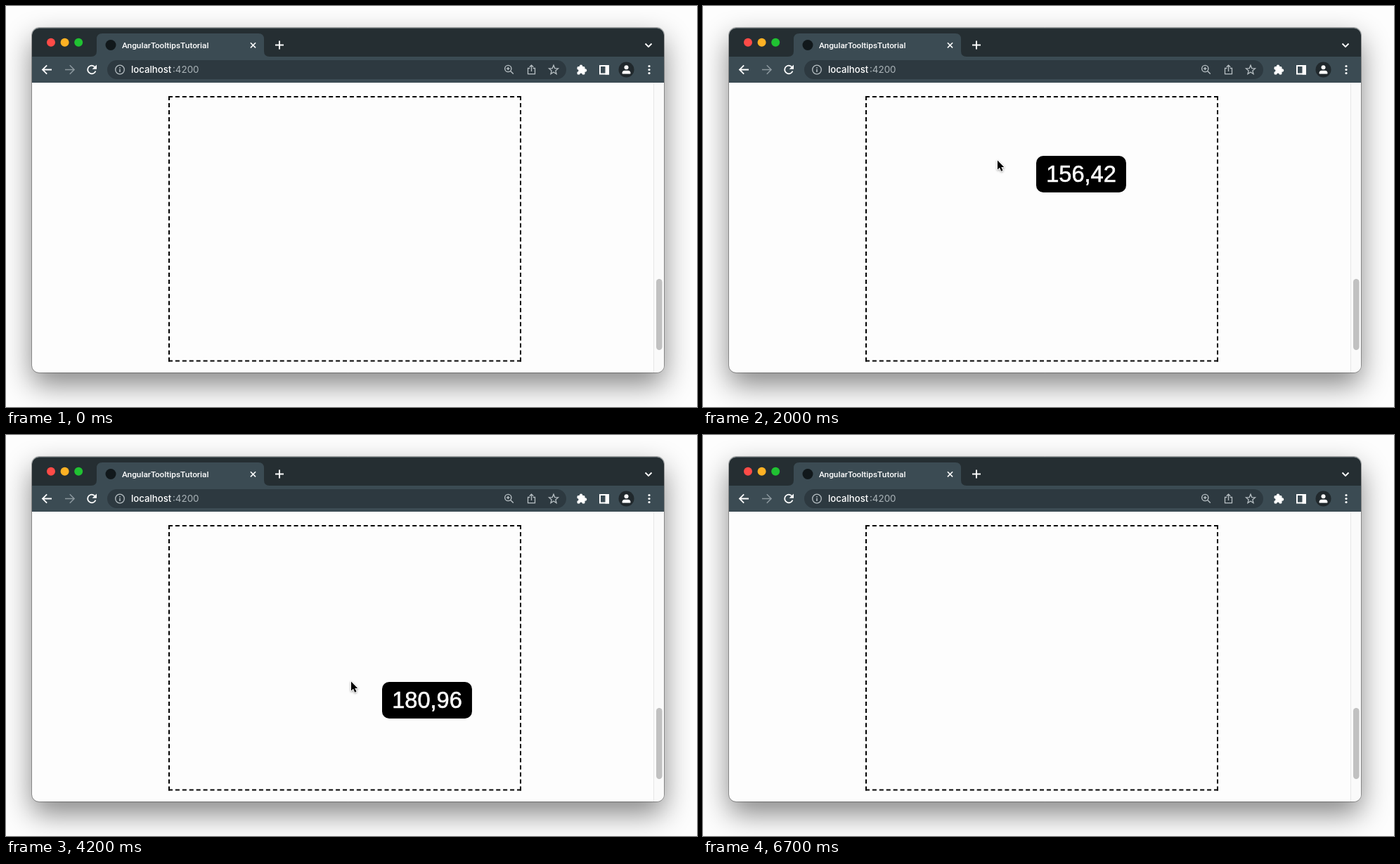
An HTML page with a canvas that plays this animation: 983 px wide and 570 px high, repeating every 6800 ms.

```html
<!DOCTYPE html>
<html lang="en">
<head>
<meta charset="utf-8">
<title>Tooltip following the pointer</title>
<style>
html, body { margin: 0; width: 100%; height: 100%; overflow: hidden; background: #fdfdfd; }
canvas { display: block; }
</style>
</head>
<body>
<canvas id="stage" width="983" height="570"></canvas>
<script>
const W = 983, H = 570, LOOP = 6800, STEP = 100;
const WHITE = '#fff', GREY = '#b7bfc3', TAB = '#3b4b53';
const AREA = { left: 231, top: 128, right: 733, bottom: 505.5 };
const ZOOM = 2.57, LAG = 40;
const screen2d = document.getElementById('stage').getContext('2d');
const backdrop = document.createElement('canvas');
backdrop.width = W;
backdrop.height = H;
let g = backdrop.getContext('2d');

// Key points of the pointer: time, x, y
const path = [
  [500, 700, -6], [1200, 574, 127], [1960, 425, 216], [2660, 350, 241], [3160, 336, 264],
  [3460, 388, 319], [3900, 455, 372], [4660, 549, 289], [5260, 668, 191], [5600, 944, -2]
];

// Smooth curve through the key points, null outside their time span
function pointerAt(t) {
  const last = path.length - 1;
  if (t < path[0][0] || t > path[last][0]) return null;
  const i = Math.max(0, path.findLastIndex((p, n) => n < last && p[0] <= t));
  const a = path[i], b = path[i + 1], span = b[0] - a[0];
  const u = (t - a[0]) / span, w = 1 - u;
  const slope = (n, k) => {
    const p = path[Math.max(0, n - 1)], q = path[Math.min(last, n + 1)];
    return (q[k] - p[k]) / (q[0] - p[0]);
  };
  return [1, 2].map(k => a[k] * (1 + 2 * u) * w * w + b[k] * u * u * (3 - 2 * u)
    + span * u * w * (slope(i, k) * w - slope(i + 1, k) * u));
}

function inArea([x, y]) {
  return x > AREA.left && x < AREA.right && y > AREA.top && y < AREA.bottom;
}

function box(x, y, w, h, r, color) {
  g.beginPath();
  g.roundRect(x, y, w, h, r);
  g.fillStyle = color;
  g.fill();
}

function stroke(color, width) {
  g.strokeStyle = color;
  g.lineWidth = width;
  g.stroke();
}

function circle(x, y, r) {
  g.beginPath();
  g.arc(x, y, r, 0, Math.PI * 2);
}

function disc(x, y, r, color) {
  circle(x, y, r);
  g.fillStyle = color;
  g.fill();
}

function ring(x, y, r, width) {
  circle(x, y, r);
  stroke(GREY, width);
}

function line(d, x, y, color, width) {
  g.save();
  g.translate(x, y);
  g.strokeStyle = color;
  g.lineWidth = width;
  g.stroke(new Path2D(d));
  g.restore();
}

function label(text, x, y, font, color) {
  g.font = font;
  g.fillStyle = color;
  g.fillText(text, x, y);
}

function drawWindow() {
  g.fillStyle = '#fdfdfd';
  g.fillRect(0, 0, W, H);
  g.save();
  g.shadowColor = 'rgba(0,0,0,.48)';
  g.shadowBlur = 40;
  g.shadowOffsetY = 17;
  box(37, 31, 899, 490, 10, '#fdfdfd');
  g.restore();
  g.beginPath();
  g.roundRect(36.5, 30.5, 900, 491, 10.5);
  stroke('rgba(0,0,0,.3)', 1);
  box(37, 31, 899, 42, [10, 10, 0, 0], '#5d686c');
  box(37, 32, 899, 41, [10, 10, 0, 0], '#252e32');
  box(37, 72, 899, 37, 0, TAB);
}

function drawTabs() {
  ['#fe4b47', '#fdb124', '#20c232'].forEach((c, i) => disc(64 + 19.6 * i, 51.7, 6, c));
  g.fillStyle = TAB;
  g.fill(new Path2D('M121 72Q129 72 129 64V47Q129 39 137 39H359Q367 39 367 47V64Q367 72 375 72Z'));
  disc(149, 55.5, 7.5, '#11181b');
  label('AngularTooltipsTutorial', 165, 59.5, '500 11.8px Roboto, sans-serif', WHITE);
  line('M-3.6-3.6L3.6 3.6M3.6-3.6L-3.6 3.6', 351.5, 55.8, WHITE, 1.5);
  line('M-6 0H6M0-6V6', 389, 55.5, WHITE, 2);
  line('M-4.5-2L0 2.5L4.5-2', 914, 55.5, WHITE, 1.8);
}

function drawAddress() {
  line('M7 0H-6M.2-6.2L-6 0L.2 6.2', 58, 90.5, WHITE, 1.8);
  line('M-7 0H6M-.2-6.2L6 0L-.2 6.2', 91, 90.5, '#8b979d', 1.6);
  g.beginPath();
  g.arc(122, 90.5, 5.8, .35, 5.5);
  stroke(WHITE, 1.8);
  g.fillStyle = WHITE;
  g.fill(new Path2D('M129 83.5V89.8H122.7Z'));

  box(144, 77, 653, 27, 13.5, '#2d3940');
  ring(162, 90.5, 6.3, 1.3);
  line('M0-.8V3.6M0-3.5V-2', 162, 90.5, GREY, 1.5);
  label('localhost', 178, 95, '500 13.2px Inter, sans-serif', WHITE);
  label(':4200', 237, 95, '13.4px Inter, sans-serif', '#abb4b8');
}

function drawActions() {
  ring(714.3, 89, 4.6, 1.4);
  line('M3.4 3.4L7.5 7.5M-2.2 0H2.2M0-2.2V2.2', 714.3, 89, GREY, 1.4);
  line('M-2.2-2H-5V6.2H5V-2H2.2M0 2.5V-6M-2.7-3.7L0-6.4L2.7-3.7', 747.5, 90.5, GREY, 1.3);

  g.beginPath();
  for (let i = 0; i < 10; i++) {
    const r = i % 2 ? 3 : 6.8, a = i * Math.PI / 5 - Math.PI / 2;
    g.lineTo(779 + r * Math.cos(a), 91 + r * Math.sin(a));
  }
  g.closePath();
  stroke(GREY, 1.3);

  box(812.5, 86, 11, 11.5, 1.5, WHITE);
  disc(818, 85.6, 2.2, WHITE);
  disc(824, 91.5, 2.2, WHITE);
  disc(812.6, 91.8, 1.9, TAB);
  disc(818, 97.5, 1.9, TAB);

  line('M-6-5.5H6V6H-6Z', 851, 90.5, WHITE, 2);
  box(852.5, 84, 5.5, 13.5, 0, WHITE);

  disc(882.5, 90.5, 11, '#20282c');
  disc(882.5, 87.3, 3, WHITE);
  box(876.5, 91.8, 12, 4.6, [5, 5, 1, 1], WHITE);
  for (let i = -1; i <= 1; i++) disc(915, 90.5 + 5 * i, 1.6, WHITE);
}

function dashed(x1, y1, x2, y2) {
  const len = Math.hypot(x2 - x1, y2 - y1), dash = 6;
  const gaps = Math.round((len - dash) / 10);
  g.setLineDash([dash, (len - dash) / gaps - dash]);
  g.beginPath();
  g.moveTo(x1, y1);
  g.lineTo(x2, y2);
  stroke('#000', 2);
  g.setLineDash([]);
}

function drawPage() {
  const { left, top, right, bottom } = AREA;
  box(921, 109, 15, 412, [0, 0, 10, 0], '#fafafa');
  box(921, 109, 1, 412, 0, '#e6e6e6');
  box(925, 388, 8.5, 101, 4.2, '#c1c1c1');
  for (const y of [top + 1, bottom - 1]) dashed(left, y, right, y);
  for (const x of [left + 1, right - 1]) dashed(x, top, x, bottom);
}

// The tooltip trails the pointer and shows its position in page units
function drawTip([px, py]) {
  const x = Math.round(px + 49), y = Math.round(py - 3);
  const text = Math.round((x - 73) / ZOOM) + ',' + Math.round((y - 105) / ZOOM);
  const font = '32.6px "Liberation Sans", Arial, sans-serif';
  g.font = font;
  box(x, y, g.measureText(text).width + 28.3, 52, 10, '#000');
  label(text, x + 14.2, y + 37, font, WHITE);
  g.strokeStyle = WHITE;
  g.lineWidth = .6;
  g.strokeText(text, x + 14.2, y + 37);
}

const arrowShape = new Path2D('M0 0V13L3 10.3L5.2 15.2L7.5 14.2L5.3 9.4H9.2Z');

function drawPointer([x, y]) {
  g.save();
  g.translate(Math.round(x), Math.round(y) + .5);
  g.shadowColor = 'rgba(0,0,0,.4)';
  g.shadowBlur = 3;
  g.shadowOffsetY = 1;
  g.lineJoin = 'round';
  g.strokeStyle = WHITE;
  g.lineWidth = 1.7;
  g.stroke(arrowShape);
  g.shadowColor = 'transparent';
  g.fillStyle = '#000';
  g.fill(arrowShape);
  g.restore();
}

function render(now) {
  const t = Math.floor(now % LOOP / STEP) * STEP;
  const pointer = pointerAt(t), trail = pointerAt(t - LAG);
  g.drawImage(backdrop, 0, 0);
  if (pointer && trail && inArea(pointer) && inArea(trail)) drawTip(trail);
  if (pointer) drawPointer(pointer);
}

drawWindow();
drawTabs();
drawAddress();
drawActions();
drawPage();
g = screen2d;

const start = performance.now();
function tick() {
  render(performance.now() - start);
  requestAnimationFrame(tick);
}
tick();
</script>
</body>
</html>
```
